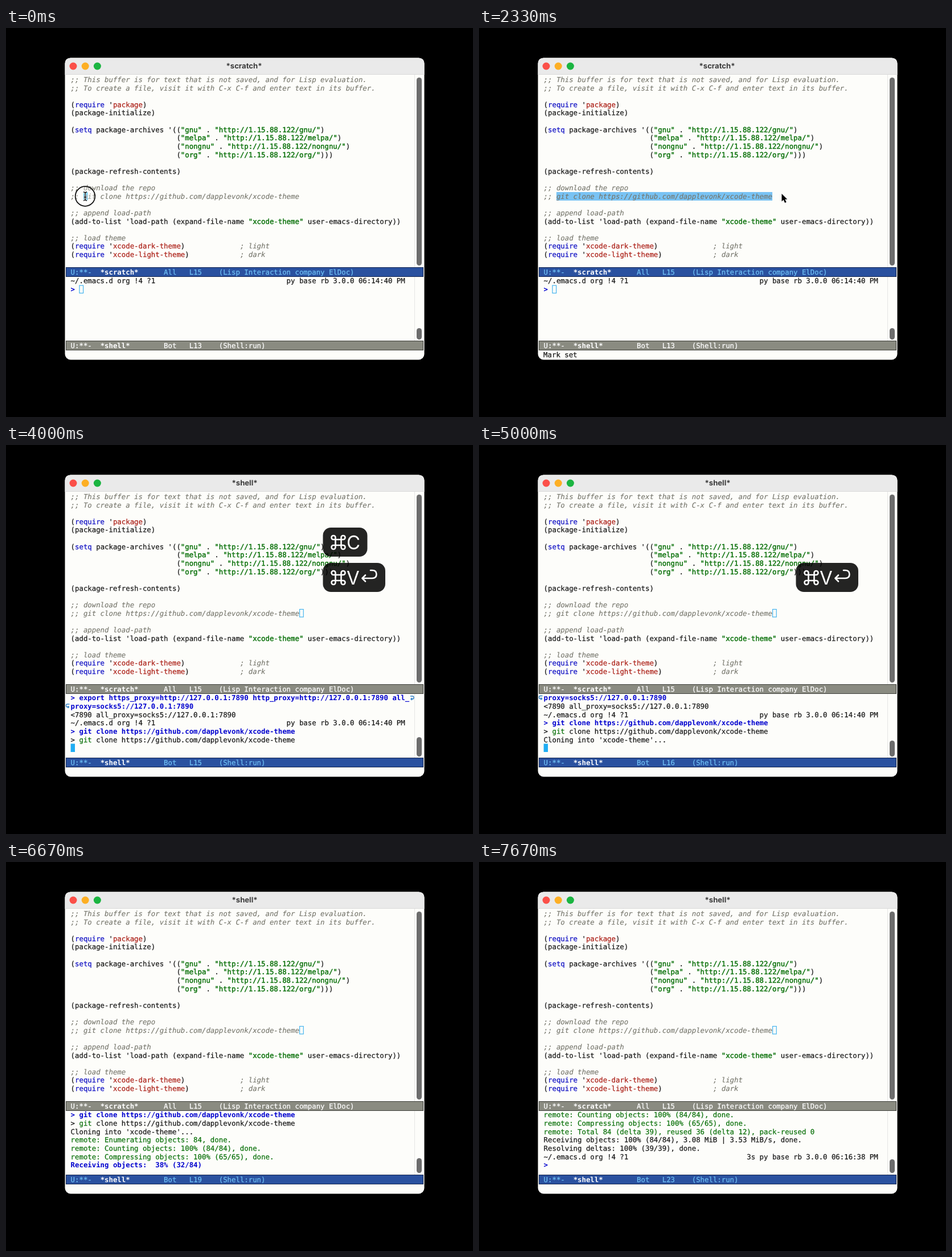
Animation of 820x683 px, one loop 8000 ms. Source, as an HTML page:

```html
<!DOCTYPE html>
<html lang="en">
<head>
<meta charset="utf-8">
<title>Emacs session</title>
<style>
html, body { margin: 0; height: 100%; overflow: hidden; background: #000; }
svg { display: block; }
text { font: 12.35px "DejaVu Sans Mono", monospace; color: #1b1b1b; white-space: pre; text-rendering: geometricPrecision; }
text, tspan { fill: currentColor; stroke: currentColor; stroke-width: .25; }
.com { color: #75756b; font-style: italic; stroke-width: .12; }
.key { color: #1010c4; }
.str, .ok { color: #0c720c; }
.str { stroke-width: .45; }
.con { color: #ac2018; }
.cmd { color: #0000cf; font-weight: bold; stroke: none; }
.name { color: #fff; font-weight: bold; stroke: none; }
.title { font: bold 13.1px Inter, sans-serif; color: #3b3b3b; stroke: none; text-anchor: middle; }
.cap { font: 33px Inter, sans-serif; color: #fff; stroke: none; }
</style>
</head>
<body>
<svg id="stage" width="820" height="683" viewBox="0 0 820 683"></svg>
<script>
const stage = document.getElementById('stage');
const LEFT = 113.6, CW = 7.435, LH = 14.62, CODE_Y = 95, SHELL_Y = 448.4, DURATION = 8000;
const CYAN = '#20adf3';
const url = 'https://github.com/dapplevonk/xcode-theme';

const code = `;; This buffer is for text that is not saved, and for Lisp evaluation.
;; To create a file, visit it with C-x C-f and enter text in its buffer.

(require 'package)
(package-initialize)

(setq package-archives '(("gnu" . "http://1.15.88.122/gnu/")
                         ("melpa" . "http://1.15.88.122/melpa/")
                         ("nongnu" . "http://1.15.88.122/nongnu/")
                         ("org" . "http://1.15.88.122/org/")))

(package-refresh-contents)

;; download the repo
;; git clone ${url}

;; append load-path
(add-to-list 'load-path (expand-file-name "xcode-theme" user-emacs-directory))

;; load theme
(require 'xcode-dark-theme)             ; light
(require 'xcode-light-theme)            ; dark`.split('\n');

const span = (cls, s) => `<tspan class="${cls}">${s}</tspan>`;
const text = (x, y, s, attr = '') => `<text x="${x}" y="${y}" ${attr}>${s}</text>`;
const rect = (x, y, w, h, fill, attr = '') =>
  `<rect x="${x}" y="${y}" width="${w}" height="${h}" fill="${fill}" ${attr}/>`;
const path = (d, attr) => `<path d="${d}" ${attr}/>`;
const colX = col => LEFT + col * CW;
const rowY = (base, row) => Math.round(base + row * LH);

const highlight = line => line
  .replace(/(;.*)|("[^"]*")|(?<=\()(require|setq)|(?<=require ')([\w-]+)/g,
    (s, com, str, key) => span(com ? 'com' : str ? 'str' : key ? 'key' : 'con', s));

const prompt = right => '~/.emacs.d org !4 ?1'.padEnd(79 - right.length) + right;
const log = [
  span('cmd', '&gt; export https_proxy=http://127.0.0.1:7890 http_proxy=http://127.0.0.1:7890 all_'),
  span('cmd', 'proxy=socks5://127.0.0.1:7890'),
  '&lt;7890 all_proxy=socks5://127.0.0.1:7890',
  prompt('py base rb 3.0.0 06:14:40 PM'),
  span('cmd', '&gt; git clone ' + url),
  `&gt; ${span('ok', 'git')} clone ${url}`,
  "Cloning into 'xcode-theme'...",
  span('ok', 'remote: Enumerating objects: 84, done.'),
  span('ok', 'remote: Counting objects: 100% (84/84), done.'),
  span('ok', 'remote: Compressing objects: 100% (65/65), done.'),
  span('ok', 'remote: Total 84 (delta 39), reused 36 (delta 12), pack-reused 0'),
  'Receiving objects: 100% (84/84), 3.08 MiB | 3.53 MiB/s, done.',
  'Resolving deltas: 100% (39/39), done.',
  prompt('3s py base rb 3.0.0 06:16:38 PM'),
  span('cmd', '&gt;')
];

// Visible shell lines, the line number, scroll thumb and cursor [row, col] at a step
function shellState(k) {
  const gt = span('cmd', '&gt;');
  if (k < 12) {
    const pasted = k === 11;
    return { first: 3, rows: [log[3], pasted ? `${gt} git clone ${url}` : gt],
      line: 13, thumb: [527, 547], cursor: [1, pasted ? 12 + url.length : 2] };
  }
  const view = (first, end, line, thumb, extra = []) =>
    ({ first, rows: [...log.slice(first, end), ...extra], line, thumb, cursor: k < 19 && [6, 0] });
  if (k < 13) return view(0, 6, 15, [513, 547]);
  if (k < 18) return view(1, 7, 16, [519, 547]);
  if (k < 23) {
    const n = [0, 7, 32, 52, 71][k - 18];
    const pct = String(Math.floor(n / 84 * 100)).padStart(3);
    return view(4, 10, 19, [520, 546],
      n ? [span('cmd', `Receiving objects: ${pct}% (${n}/84)`)] : []);
  }
  return view(8, 15, 23, [522, 546]);
}

function cursorBox(x, y, solid) {
  return solid ? rect(x, y, CW, 14.5, CYAN)
    : rect(x + .5, y + .5, CW - .8, 13.5, 'none', 'stroke="#45b4ee" stroke-width="1.2"');
}

function modeLine(y, active, name, rest) {
  const [bg, edge, fg] = active ? ['#2a519f', '#14264f', '#6fc0f5'] : ['#8a8b81', '#3f403b', '#fff'];
  return rect(105.5, y + .5, 627, 16, bg, `stroke="${edge}"`) +
    text(LEFT, y + 12.5, `U:**-  ${span('name', name.padEnd(15))}${rest}`, `style="color:${fg}"`);
}

const thumb = (top, bottom) => rect(721, top, 9, bottom - top, '#6c6c6c', 'rx="4.5"');

function keyCap(y, letter, enter) {
  const loop = [0, 90, 180, 270].map(a =>
    path('M-5-5H-8.5A3.5 3.5 0 1 1-5-8.5Z', `transform="rotate(${a})"`)).join('');
  const arrow = 'M631 21.500L625.500 27L631 32.500M626 27H643Q650.500 27 650.500 20Q650.500 13 643 13H640';
  return `<g transform="translate(0 ${y})">` +
    rect(556.5, 0, enter ? 109.5 : 78, 51, '#000', 'rx="14" opacity=".86"') +
    `<g fill="none" stroke="#fff" stroke-width="2.6"><g transform="translate(583.5 26)">` +
    path('M-5-5H5V5H-5Z', '') + loop + '</g>' +
    (enter ? path(arrow, 'stroke-linecap="round" stroke-linejoin="round"') : '') + '</g>' +
    text(598, 38, letter, 'class="cap"') + '</g>';
}

function pointer(k) {
  if (k > 10) return '';
  const u = Math.min(k / 3, 1), ease = u * u * (3 - 2 * u);
  const [x, y] = k < 4 ? [139 + 366 * ease, 295.5 - 6 * ease]
    : k < 5 ? [527, 292] : k < 9 ? [531.5, 291] : k < 10 ? [430, 392] : [330, 488];
  const pressed = k < 5 || k === 10;
  const beam = 'M-3-7.500Q0-7.500 0-5Q0-7.500 3-7.500M0-5V5M-3 7.500Q0 7.500 0 5Q0 7.500 3 7.500M-1.500 1.500H1.500';
  const shape = k < 5
    ? path(beam, 'fill="none" stroke="#fff" stroke-width="3"') +
      path(beam, 'fill="none" stroke="#000" stroke-width="1.3"')
    : path('M0 0V13.500L3.200 10.700L5.600 16L8.200 14.800L5.800 9.700H9.800Z',
      'stroke="#fff" stroke-width="1.2" paint-order="stroke"');
  return `<g transform="translate(${x} ${y})">` +
    (pressed ? '<circle r="17.3" fill="#fff" fill-opacity=".32" stroke="#111" stroke-width="1.8"/>' : '') +
    shape + '</g>';
}

// Region and cursor on the clone line
function selection(k) {
  const y = 288, end = [3, 19, 36, 51][k] ?? 54;
  const region = k < 8 ? rect(colX(3), y, (end - 3) * CW, 15, '#79c3f4') : '';
  return region + (k === 6 || k === 7 ? '' : cursorBox(colX(end), y, k < 10));
}

function wrapMarks(first) {
  const mark = (x, y) => path(`M${x} ${y}h4q2 0 2 2.500t-2 2.500h-3m2-2l-2 2l2 2`,
    'fill="none" stroke="#2f7fc4" stroke-width="1.4"');
  return (first === 0 ? mark(710, 441) : '') +
    (first < 2 ? `<g transform="translate(217 0) scale(-1 1)">${mark(105.5, 455 - first * 14.5)}</g>` : '');
}

function draw(k) {
  const inShell = k >= 10, shell = shellState(k);
  const lights = ['#fb5049', '#fdaf24', '#1bb541'].map((c, i) =>
    `<circle cx="${118 + i * 21.2}" cy="67" r="6.5" fill="${c}"/>`).join('');
  let s = rect(103.5, 52.5, 631, 530, '#fdfdfa', 'rx="10"') +
    path('M103.500 82V62.500Q103.500 52.500 113.500 52.500H724.500Q734.500 52.500 734.500 62.500V82Z', 'fill="#eaeaea"') +
    rect(103.5, 81, 631, 1, '#d9d9d9') + lights +
    text(inShell ? 419 : 418, 71, inShell ? '*shell*' : '*scratch*', 'class="title"') +
    rect(717, 82, 1, 338, '#e6e6e4') + rect(717, 437, 1, 112, '#e6e6e4') +
    thumb(87, 417) + thumb(...shell.thumb) + selection(k);

  code.forEach((line, i) => s += text(LEFT, rowY(CODE_Y, i), highlight(line)));
  if (k === 3) s += text(colX(51), rowY(CODE_Y, 14), 'e', 'style="color:#fff;font-style:italic"');

  s += modeLine(420, !inShell, '*scratch*', 'All   L15    (Lisp Interaction company ElDoc)');
  if (shell.cursor) {
    const [row, col] = shell.cursor;
    s += cursorBox(colX(col), rowY(SHELL_Y, row) - 11.5, inShell);
  }
  shell.rows.forEach((line, i) => s += text(LEFT, rowY(SHELL_Y, i), line));
  if (k >= 12) s += wrapMarks(shell.first);
  s += modeLine(549, inShell, '*shell*', `Bot   L${shell.line}    (Shell:run)`);

  if (k >= 5 && k < 8) s += text(LEFT - .5, 578, 'Mark set');
  if (k >= 8 && k < 14) s += keyCap(k < 11 ? 207 : 145, 'C');
  if (k >= 11 && k < 18) s += keyCap(207, 'V', k >= 12);
  stage.innerHTML = s + pointer(k);
}

let shown = -1;
function tick() {
  const t = performance.now() % DURATION;
  const k = Math.min(23, Math.floor((t + 5) * 3 / 1000));
  if (k !== shown) draw(shown = k);
  requestAnimationFrame(tick);
}
tick();
</script>
</body>
</html>
```
